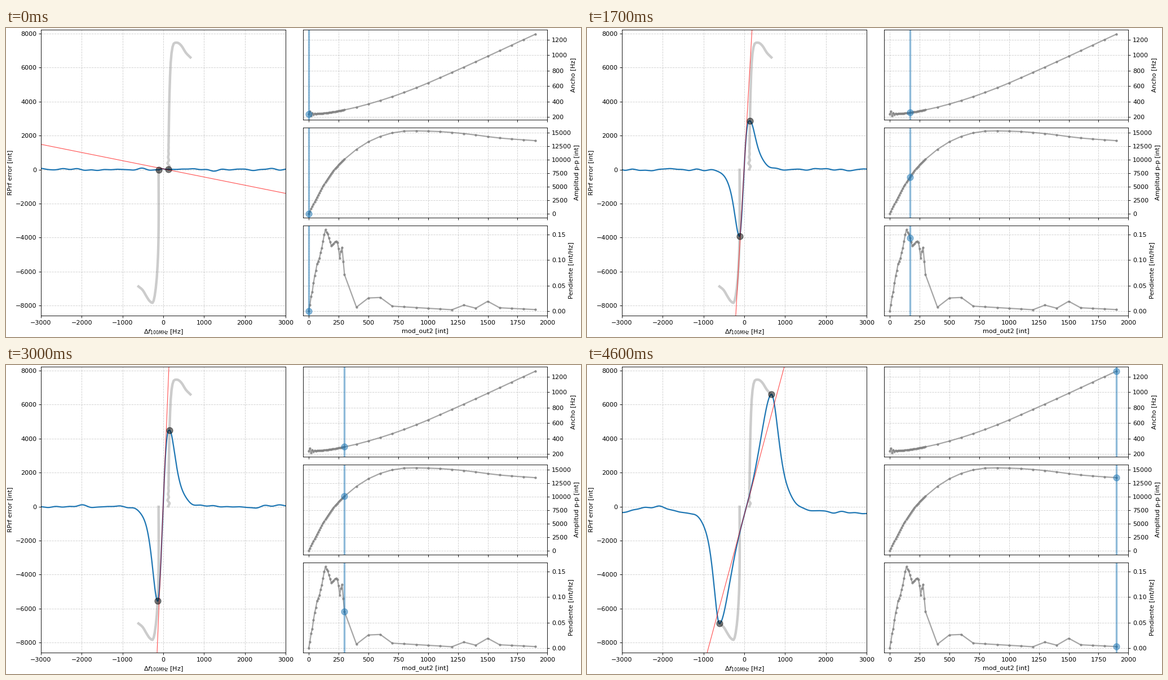
Recreate the animation shown at these times as a matplotlib script. Size 1020 by 549 pixels, loop 4700 ms.

```python
import numpy as np
import matplotlib.pyplot as plt
from matplotlib.animation import FuncAnimation

W, H, DPI = 1020, 549, 80
plt.rcParams.update({"font.family": "DejaVu Sans", "font.size": 10})


def linear(x, *pts):
    px, py = zip(*pts)
    return np.interp(x, px, py)


def smooth(x, *pts):
    """Cubic Hermite curve through a few key points."""
    px, py = np.array(pts, float).T
    tan = np.gradient(py, px)
    j = np.clip(np.searchsorted(px, x) - 1, 0, len(px) - 2)
    h = px[j + 1] - px[j]
    t = (x - px[j]) / h
    return (py[j] * (1 + 2 * t) * (1 - t)**2 + py[j + 1] * t**2 * (3 - 2 * t)
            + h * t * (1 - t) * (tan[j] * (1 - t) - tan[j + 1] * t))


# modulation depth: fine steps up to 300, coarse steps after that
mod = np.concatenate([np.arange(0, 301, 10), np.arange(400, 1901, 100)])
step = np.arange(len(mod))
fine = (step > 0) & (step < 30)

# extremes of the dispersive signal
wobble = -50 * (-0.65)**step * (step > 0)
width = wobble + smooth(mod, (0, 237), (120, 247), (300, 291), (600, 412),
                        (900, 576), (1200, 776), (1900, 1273))
x_lo = smooth(mod, (0, -115), (120, -113), (300, -138), (600, -210),
              (1000, -320), (1300, -408), (1900, -608))
y_hi = smooth(mod, (0, 15), (120, 2110), (300, 4490), (500, 6300),
              (700, 7200), (1000, 7470), (1300, 7310), (1600, 6880),
              (1900, 6600))
y_lo = smooth(mod, (0, -15), (120, -2930), (220, -4740), (300, -5560),
              (500, -6980), (700, -7720), (1000, -7770), (1300, -7480),
              (1600, -7090), (1900, -6880))
x_hi = x_lo + width
amp = y_hi - y_lo

slope_rel = linear(mod, (0, 0), (70, .095), (90, .103), (140, .160),
                   (190, .130), (240, .136), (260, .1045), (280, .1275),
                   (300, .0715), (400, .008), (500, .026), (600, .027),
                   (700, .010), (1200, .003), (1300, .012), (1400, .006),
                   (1500, .0195), (1600, .0068), (1900, .0033))
slope_rel += fine * np.random.default_rng(2).uniform(-.003, .003, len(mod))

# tangent through the centre
ratio = linear(mod, (0, -3.8), (10, 1.2), (120, 1.56), (300, 1.68),
               (600, 1.55), (1900, .84))
slope = amp / width * ratio
offset = linear(mod, (0, 42), (70, 226), (300, 225), (1300, -580), (1900, -493))

freq = np.linspace(-3000, 3000, 1201)


def baseline(i):
    rng = np.random.default_rng(100 + i)
    periods = np.geomspace(320, 2400, 10)
    phases = rng.uniform(0, 2 * np.pi, 10)
    noise = 16 * np.sin(2 * np.pi * freq[:, None] / periods + phases).sum(axis=1)
    drift = smooth(freq, (-3000, -280), (-2300, -30), (-1500, -270),
                   (0, -220), (1500, -170), (2200, -300), (3000, -360))
    return noise + drift * linear(mod[i], (300, 0), (1300, 1), (1900, 1.15))


def signal(i):
    base = baseline(i)
    side_lo = linear(mod[i], (300, 124), (1300, 137))
    side_hi = linear(mod[i], (300, 139), (1300, 170))
    w_lo = 1 / np.cosh((freq - x_lo[i]) / side_lo)
    w_hi = 1 / np.cosh((freq - x_hi[i]) / side_hi)
    left = base * (1 - w_lo) + y_lo[i] * w_lo
    right = base * (1 - w_hi) + y_hi[i] * w_hi

    # odd quintic between the extremes, flat at both ends
    xm, ym = (x_lo[i] + x_hi[i]) / 2, (y_lo[i] + y_hi[i]) / 2
    u = np.clip((freq - xm) / (width[i] / 2), -1, 1)
    r = ratio[i]
    odd = r * u + (2.5 - 2 * r) * u**3 + (r - 1.5) * u**5
    lift = offset[i] + slope[i] * xm - ym
    middle = ym + amp[i] / 2 * odd + lift * (1 - u**2)**2
    return np.where(freq < x_lo[i], left, np.where(freq > x_hi[i], right, middle))


fig = plt.figure(figsize=(W / DPI, H / DPI), dpi=DPI, facecolor="white")


def panel(x0, top, x1, bottom, xlim, ylim, xticks, yticks):
    ax = fig.add_axes([x0 / W, 1 - bottom / H, (x1 - x0) / W, (bottom - top) / H])
    ax.set(xlim=xlim, ylim=ylim, xticks=xticks, yticks=yticks)
    ax.grid(linestyle="--", alpha=0.6)
    return ax


main = panel(62, 3, 496, 511, (-3000, 3000), (-8595, 8231),
             range(-3000, 3001, 1000), range(-8000, 8001, 2000))
main.set_xlabel(r"$\Delta f_{100MHz}$ [Hz]")
main.set_ylabel("RPrf error [int]")
for px, py in ((x_hi, y_hi), (x_lo, y_lo)):
    main.plot(px, py, color="gray", alpha=0.4, lw=4)
curve, = main.plot([], [], color="C0", lw=2)
tangent, = main.plot([], [], color="red", alpha=0.7, lw=1)
peaks, = main.plot([], [], "o", color="black", alpha=0.5, ms=10)

panels = [
    ("Ancho [Hz]", width, (163, 1331), np.arange(200, 1201, 200)),
    ("Amplitud p-p [int]", amp, (-735, 15890), np.arange(0, 15001, 2500)),
    ("Pendiente [int/Hz]", slope_rel, (-.0085, .1677), np.arange(4) * .05),
]
cursors = []
for row, (label, data, ylim, ticks) in enumerate(panels):
    top = 3 + 174 * row
    ax = panel(526.9, top, 960.4, top + 160, (-47.5, 2000), ylim,
               range(0, 2001, 250), ticks)
    ax.yaxis.tick_right()
    ax.yaxis.set_label_position("right")
    ax.set_ylabel(label)
    ax.tick_params(labelbottom=row == 2)
    ax.plot(mod, data, ".-", color="gray", alpha=0.7, lw=2, ms=6)
    bar = ax.axvline(0, color="C0", alpha=0.5, lw=3)
    dot, = ax.plot([], [], "o", color="C0", alpha=0.5, ms=10)
    cursors.append((bar, dot, data))
ax.set_xlabel("mod_out2 [int]")


def update(i):
    curve.set_data(freq, signal(i))
    ends = np.array([-3000, 3000])
    tangent.set_data(ends, offset[i] + slope[i] * ends)
    peaks.set_data([x_lo[i], x_hi[i]], [y_lo[i], y_hi[i]])
    for bar, dot, data in cursors:
        bar.set_xdata([mod[i], mod[i]])
        dot.set_data([mod[i]], [data[i]])
    return []


anim = FuncAnimation(fig, update, frames=len(mod), interval=100,
                     init_func=lambda: update(0), repeat=True, repeat_delay=0)
plt.show()
```
